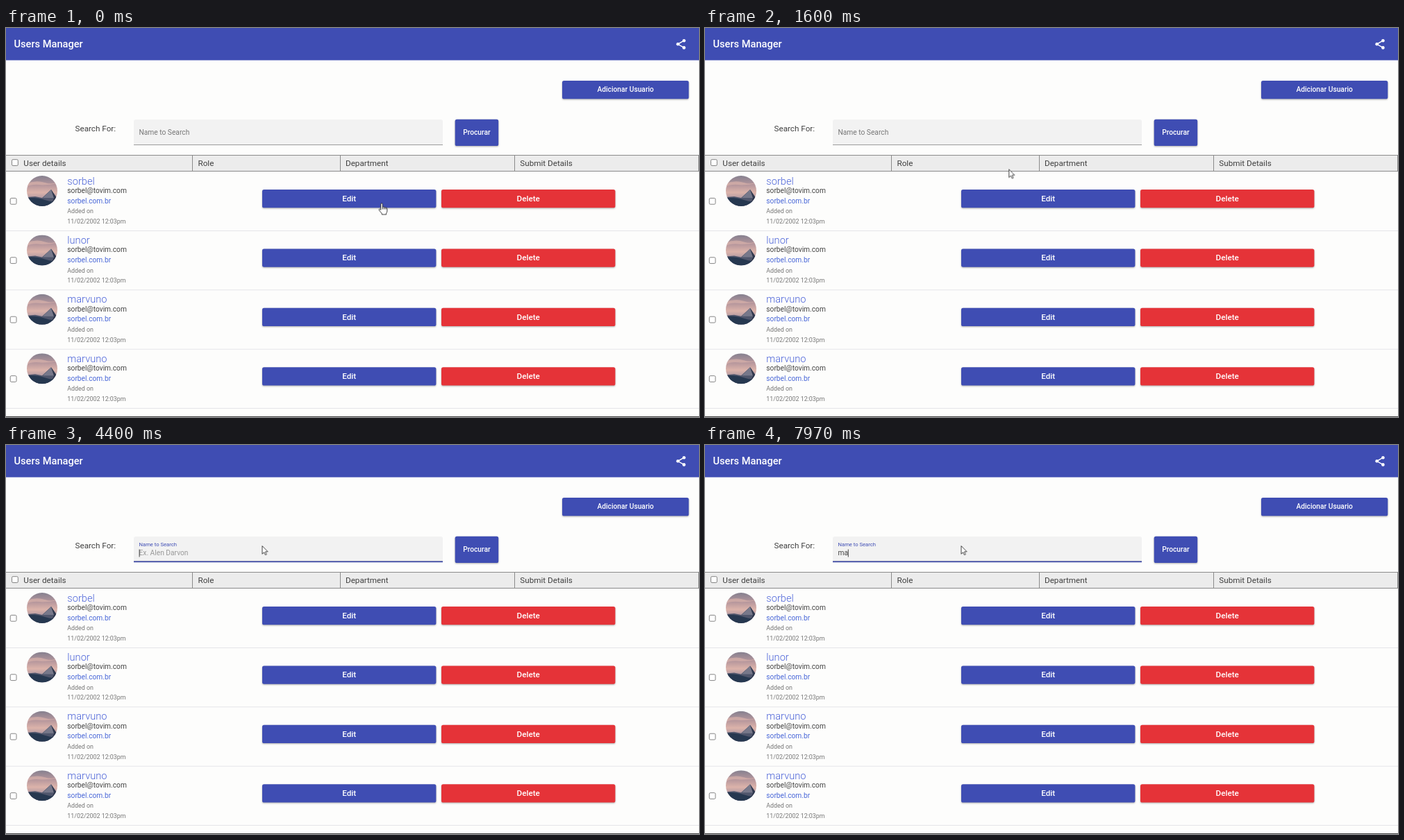
These frames come from a looping animation (998x561 px, 8000 ms). An HTML page:

```html
<!DOCTYPE html>
<html lang="pt">
<head>
<meta charset="utf-8">
<title>Users Manager</title>
<style>
  html, body { margin: 0; width: 100%; height: 100%; overflow: hidden; background: #fdfdfc; }
  svg { display: block; width: 998px; height: 561px; }
  text { font-family: Roboto, sans-serif; font-size: 10.23px; fill: #444; white-space: pre; }
  .title { font-size: 14.61px; font-weight: 500; fill: #fff; }
  .mid { font-size: 11.69px; fill: #404040; }
  .btn text { font-weight: 500; fill: #fff; text-anchor: middle; }
  .btn .big { font-size: 11.69px; }
  .btn rect { filter: drop-shadow(0 1.3px 1px rgba(0, 0, 0, .32)); }
  .name { font-size: 14.61px; font-weight: 300; fill: #4a62d8; }
  .link { fill: #4a68d8; }
  .small { font-size: 8.9px; fill: #777; }
  .box { fill: #fff; stroke: #767676; stroke-width: .9; }

  .anim { animation: 8s step-end infinite; }
  #cursor { animation-name: move; }
  #hand, #arrow { animation-name: pointer; }
  #hand { --over: 1; --out: 0; }
  #arrow { --over: 0; --out: 1; }
  #hoverLine { animation-name: hover; }
  #focusLine { animation-name: focus; transform-origin: 406.5px 168px; }
  #label { animation-name: label; }
  #hint { animation-name: hint; fill: #999; }
  #typedD { animation-name: typedD; }
  #typedM { animation-name: typedM; }
  #typedA { animation-name: typedA; }
  #caret { animation-name: blink; }
  #caretPos { animation-name: caretPos; }

  @keyframes move {
    0% { transform: translate(541px, 252.5px); }
    2.5% { transform: translate(541px, 252.5px); animation-timing-function: ease-in-out; }
    11.25% { transform: translate(605px, 345.5px); }
    13.75% { transform: translate(605px, 345.5px); animation-timing-function: ease-in-out; }
    23.75%, 100% { transform: translate(368.5px, 145px); }
  }
  @keyframes pointer {
    0%, 7.93%, 14.4%, 18.3% { opacity: var(--over); }
    4.25%, 10.9%, 16.45%, 19.15%, 100% { opacity: var(--out); }
  }
  @keyframes hover {
    0% { opacity: 0; }
    21.25%, 100% { opacity: 1; }
  }
  @keyframes focus {
    0% { opacity: 0; transform: scaleX(.5); }
    29.25% { opacity: 1; transform: scaleX(.5); animation-timing-function: cubic-bezier(.25, .8, .25, 1); }
    32%, 100% { opacity: 1; transform: none; }
  }
  @keyframes label {
    0% { transform: translate(191.5px, 154px); fill: #777; }
    29.25% { transform: translate(191.5px, 154px); fill: #777; animation-timing-function: cubic-bezier(.25, .8, .25, 1); }
    34.25%, 100% { transform: translate(191.5px, 145.8px) scale(.75); fill: #3f4db5; }
  }
  @keyframes hint {
    0% { opacity: 0; }
    29.25% { opacity: 0; animation-timing-function: ease; }
    34.25%, 90% { opacity: 1; }
    72.5%, 95%, 100% { opacity: 0; }
  }
  @keyframes typedD {
    0%, 90%, 100% { opacity: 0; }
    72.5% { opacity: 1; }
  }
  @keyframes typedM {
    0% { opacity: 0; }
    95%, 100% { opacity: 1; }
  }
  @keyframes typedA {
    0% { opacity: 0; }
    97.5%, 100% { opacity: 1; }
  }
  @keyframes blink {
    0%, 35.5%, 48%, 60.5%, 78.75% { opacity: 0; }
    29.25%, 41.75%, 54.25%, 66.75%, 85%, 100% { opacity: 1; }
  }
  @keyframes caretPos {
    0%, 90% { transform: translateX(191.6px); }
    72.5% { transform: translateX(197.8px); }
    95% { transform: translateX(200.8px); }
    97.5%, 100% { transform: translateX(205.8px); }
  }
</style>
</head>
<body>
<svg viewBox="0 0 998 561">
  <defs>
    <linearGradient id="sky" x2="0" y2="1">
      <stop offset="0" stop-color="#85808f"/>
      <stop offset=".3" stop-color="#b5969c"/>
      <stop offset=".55" stop-color="#dcb3aa"/>
      <stop offset=".8" stop-color="#a793a0"/>
    </linearGradient>
    <clipPath id="round"><circle cx="52" cy="235" r="22"/></clipPath>
    <g id="avatar" clip-path="url(#round)">
      <rect x="30" y="213" width="44" height="44" fill="url(#sky)"/>
      <path d="M30 224Q44 219 56 223T74 221V224Q60 227 48 226T30 229Z" fill="#e2b8ae" opacity=".6"/>
      <path d="M30 244L42 243L52 245L65 233L74 246V257H30Z" fill="#50566c"/>
      <path d="M53 245L65 233L69 245Z" fill="#77788a"/>
      <path d="M65 233L74 247V257H64L69 245Z" fill="#30384d"/>
      <path d="M30 245Q44 244 56 248T74 249V257H30Z" fill="#263850"/>
    </g>
  </defs>

  <rect width="998" height="561" fill="#fdfdfc"/>
  <rect width="998" height="46.5" fill="#3f4db3"/>
  <text class="title" x="11.5" y="28.3">Users Manager</text>
  <g fill="#fff" stroke="#fff" stroke-width="1.5">
    <path d="M976.4 18.2L967.6 23.3L976.4 28.4" fill="none"/>
    <g stroke="none">
      <circle cx="976.4" cy="18.2" r="2.3"/>
      <circle cx="967.6" cy="23.3" r="2.3"/>
      <circle cx="976.4" cy="28.4" r="2.3"/>
    </g>
  </g>

  <text class="mid" x="99.5" y="149">Search For:</text>
  <path d="M184 169V135Q184 132 187 132H626Q629 132 629 135V169Z" fill="#f2f2f2"/>
  <rect x="184" y="168.2" width="445" height=".8" fill="#888"/>
  <rect id="hoverLine" class="anim" x="184" y="167.6" width="445" height="1.5" fill="#2b2b2b"/>
  <rect id="focusLine" class="anim" x="184" y="167.6" width="445" height="1.5" fill="#3f4db5"/>
  <text id="label" class="anim">Name to Search</text>
  <text id="hint" class="anim" x="191.5" y="159.3">Ex. Alen Darvon</text>
  <text id="typedD" class="anim" x="191.5" y="159.3">d</text>
  <text id="typedM" class="anim" x="191.5" y="159.3">m<tspan id="typedA" class="anim"></tspan></text>
  <text id="typedA2" x="200.4" y="159.3"></text>
  <g id="caretPos" class="anim"><rect id="caret" class="anim" y="150.5" width=".9" height="11" fill="#333"/></g>

  <rect x="-.5" y="183.5" width="998" height="23" fill="#ececec" stroke="#8a8a8a"/>
  <path d="M268.5 183V207M481.5 183V207M732.5 183V207" stroke="#8a8a8a"/>
  <rect class="box" x="8.5" y="189.7" width="8.8" height="8.8" rx="1.6"/>

  <g id="content"></g>
  <rect y="560" width="998" height="1" fill="#444"/>

  <g id="cursor" class="anim" stroke-linejoin="round">
    <path id="arrow" class="anim" d="M.5 .5V12.2L3.2 9.7L5 13.6L6.8 12.8L5 8.9H8.6Z" fill="#fff" stroke="#333" stroke-width=".9"/>
    <path id="hand" class="anim" d="M-1.2 10V1.6Q-1.2 .3 0 .3T1.3 1.6V6Q2.6 5 3.6 6.2Q5 5.5 5.9 6.8Q7.9 6.5 7.9 8.4V11.5Q7.9 13.4 6.6 14.6V16.4H.3V15L-3.7 10.3Q-4.3 8.9 -3.1 8.5Q-2.2 8.4 -1.2 10ZM1.3 6V9M3.6 6.2V9M5.9 6.8V9.2" fill="#fff" stroke="#222" stroke-width=".9"/>
  </g>
</svg>
<script>
  const ROW_STEP = 85.4;
  const BLUE = '#3f4db3', RED = '#e53338';
  const text = (cls, x, y, label) => `<text class="${cls}" x="${x}" y="${y}">${label}</text>`;
  const button = (x, y, w, h, color, label, cls = '') =>
    `<g class="btn"><rect x="${x}" y="${y}" width="${w}" height="${h}" rx="2.6" fill="${color}"/>` +
    text(cls, x + w / 2, y + h / 2 + (cls ? 3.6 : 3.2), label) + '</g>';

  const row = (name, i) => `<g transform="translate(0 ${i * ROW_STEP})">
    <rect class="box" x="6.2" y="245.4" width="8.8" height="8.8" rx="1.6"/>
    <use href="#avatar"/>
    ${text('name', 88.3, 225.5, name)}
    ${text('', 88.3, 238, 'sorbel@tovim.com')}
    ${text('link', 88.3, 252.7, 'sorbel.com.br')}
    ${text('small', 88.3, 267.3, 'Added on')}
    ${text('small', 88.3, 281.8, '11/02/2002 12:03pm')}
    ${button(369, 233, 250.4, 26.3, BLUE, 'Edit', 'big')}
    ${button(627, 233, 250.4, 26.3, RED, 'Delete', 'big')}
    <rect y="292" width="998" height=".8" fill="#dfdfe4"/>
  </g>`;

  const heads = [['User details', 25.3], ['Role', 276.5], ['Department', 489], ['Submit Details', 740.3]];
  document.getElementById('content').innerHTML =
    button(801, 76, 182.3, 26.3, BLUE, 'Adicionar Usuario') +
    button(646.7, 131.7, 62.5, 38.3, BLUE, 'Procurar') +
    heads.map(([label, x]) => text('mid', x, 198.6, label)).join('') +
    ['sorbel', 'lunor', 'marvuno', 'marvuno'].map(row).join('');

  // The second letter follows the first as its own text so that it can appear alone.
  const second = document.getElementById('typedA2');
  document.getElementById('typedA').remove();
  second.id = 'typedA';
  second.setAttribute('class', 'anim');
  second.textContent = 'a';
</script>
</body>
</html>
```
